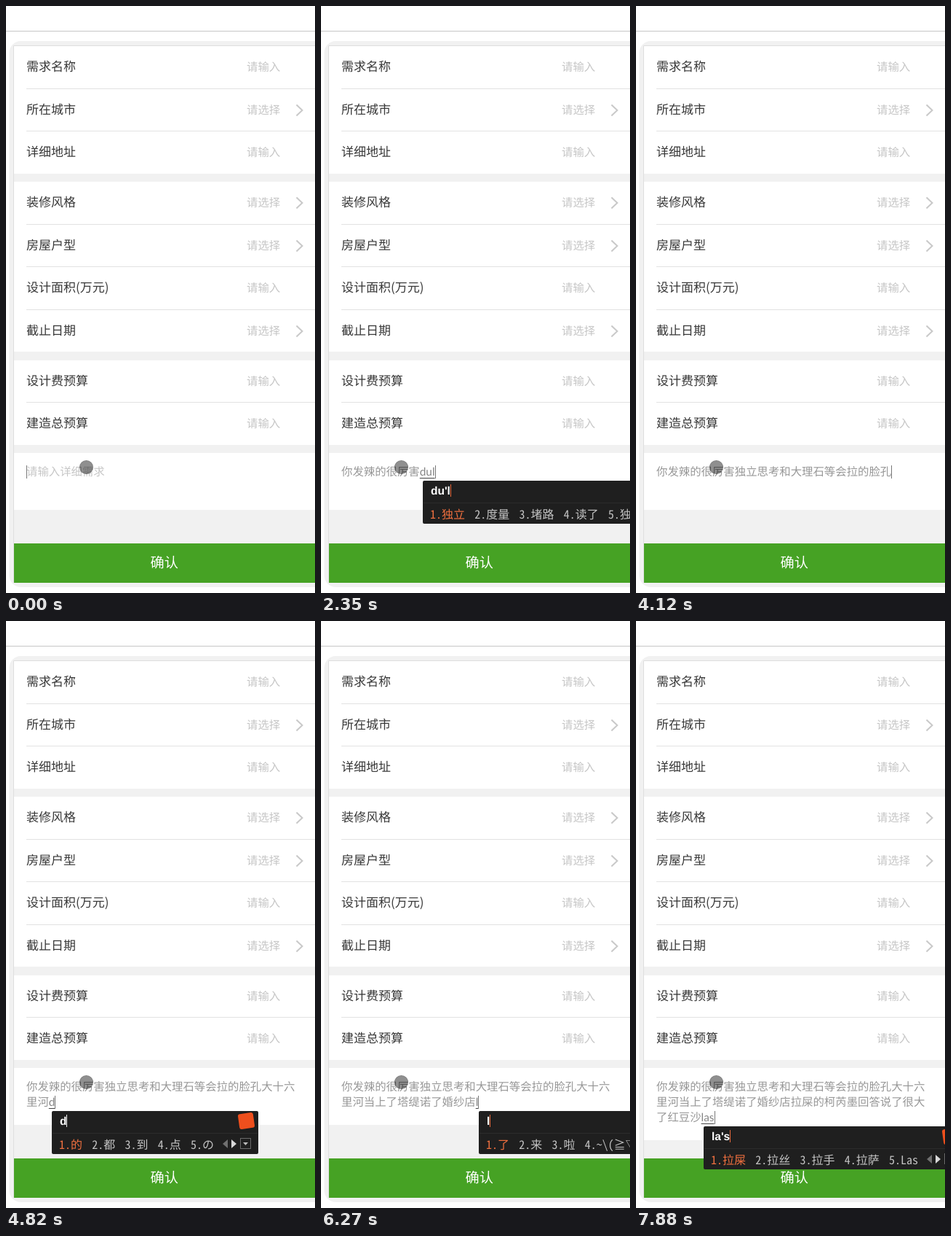
Animation, 425 px wide and 805 px high, one loop 8000 ms. Source, as an HTML page:

```html
<!DOCTYPE html>
<html lang="zh-CN">
<head>
<meta charset="utf-8">
<title>需求表单</title>
<style>
  html, body { margin: 0; width: 425px; height: 805px; overflow: hidden; background: #fff; }
  body {
    position: relative;
    font-family: "Noto Sans CJK SC", "Noto Sans CJK", "Noto Sans", sans-serif;
    text-rendering: geometricPrecision;
  }
  #form { position: absolute; left: 0; top: 0; }
  .label { font-size: 17px; fill: #383838; }
  .hint { font-size: 15.4px; fill: #c6c6c6; }
  .confirm { font-size: 19.2px; fill: #fff; text-anchor: middle; }

  #area { position: absolute; left: 11px; top: 613px; width: 414px; height: 78px; background: #fff; }
  #area.tall { height: 99px; }
  #text {
    position: absolute; left: 28px; top: 628px; width: 380px;
    font-size: 15.4px; line-height: 21px; color: #979797;
    white-space: pre-wrap; word-break: break-all;
  }
  #text.empty { color: #c6c6c6; }
  #text u {
    font-family: Lato, "Liberation Sans", sans-serif; line-height: 0; color: #858585;
    text-decoration: underline 1px #444; text-underline-offset: 3px;
  }
  .caret { position: absolute; width: 1px; height: 18px; margin-top: 2px; background: #777; }
  #touch {
    position: absolute; left: 101px; top: 623px; width: 19px; height: 19px; box-sizing: border-box;
    border-radius: 50%; background: rgba(0, 0, 0, .44); border: 1px solid rgba(0, 0, 0, .1);
  }

  #ime {
    position: absolute; height: 59px; background: #1f1f1f; border-radius: 2px;
    white-space: nowrap; color: #c4c4c4;
  }
  #ime::before {
    content: ""; position: absolute; left: 1px; right: 1px; top: 30px; height: 1px; background: #2c2c2c;
  }
  #pinyin {
    position: absolute; left: 11px; top: 5px; color: #fff;
    font: bold 15.5px/20px "Liberation Sans", Arial, sans-serif;
  }
  #pinyin::after {
    content: ""; display: inline-block; width: 1px; height: 17px;
    vertical-align: -3px; background: #e8693c;
  }
  .cold #pinyin::after { background: #eee; }
  #list {
    display: flex; gap: 13.2px; padding: 33px 10px 0 10px; line-height: 24px; height: 24px;
    font-family: "Noto Sans Mono CJK SC", "Noto Sans CJK SC", "Noto Sans CJK", monospace;
    font-size: 16px; font-weight: 300;
  }
  #list span:first-child { color: #f0703f; }
  #list.plain span:first-child { color: #c4c4c4; }
  #list.plain span:first-child i { color: #c9653c; }
  #list i { font-style: normal; }
  #list svg { flex: none; margin: 4px 0 0 -1px; }
  #badge {
    position: absolute; right: 6px; top: 3px; width: 21px; height: 21px;
    border-radius: 3px; background: #ee4f1d; transform: rotate(-8deg);
  }
</style>
</head>
<body>
<svg id="form" width="425" height="805">
  <path d="M0 34.5H425" stroke="#c6c6c6"/>
  <rect x="4.5" y="48" width="460" height="749" rx="16" fill="#f1f1f1"/>
  <path d="M10.5 791V54.5H425" fill="none" stroke="#dedede"/>
  <path d="M11 55H425V230H11zM11 241H425V474H11zM11 486H425V602H11z" fill="#fff"/>
  <rect x="11" y="737" width="414" height="54" fill="#46a224"/>
  <text class="confirm" x="217.7" y="770">确认</text>
  <g id="rows"></g>
</svg>
<div id="area"></div>
<div id="text"></div>
<div id="touch"></div>
<div id="ime"><div id="pinyin"></div><div id="badge"></div><div id="list"></div></div>

<script>
const $ = id => document.getElementById(id);

// Form rows: centre, label, opens a picker
const rows = [
  [83, '需求名称'], [142, '所在城市', 1], [200, '详细地址'],
  [269, '装修风格', 1], [328, '房屋户型', 1], [386, '设计面积(万元)'], [445, '截止日期', 1],
  [514, '设计费预算'], [572, '建造总预算']
];
const rules = [113, 171, 299, 357, 416, 543];
$('rows').innerHTML =
  rules.map(y => `<path d="M28 ${y + .5}H425" stroke="#e2e2e2"/>`).join('') +
  rows.map(([y, label, pick]) =>
    `<text class="label" x="28" y="${y + 6}">${label}</text>` +
    `<text class="hint" x="331" y="${y + 6}">${pick ? '请选择' : '请输入'}</text>` +
    (pick ? `<path d="M399.5 ${y - 6.5}l8 7.5l-8 7.5" fill="none" stroke="#c9c9c9" stroke-width="2"/>` : '')
  ).join('');

const story = '你发辣的很厉害独立思考和大理石等会拉的脸孔大十六' +
  '里河当上了塔缇诺了婚纱店拉屎的柯芮墨回答说了很大了红豆沙';
const D = '的 都 到 点 の';
const L = '了 来 啦 ~\\(≧▽≦)/~啦啦啦 咯';

// Start time, committed characters, pinyin being typed, candidates, popup style
const steps = [
  [0, 0],
  [280, 0, 'n', '你 那 能 呢 年'],
  [430, 0, 'ni', '你 尼 你们 你的 你好'],
  [740, 0, "ni'f", '你发 你放 你父亲 你分 Nif'],
  [1170, 2],
  [1320, 2, 'l', L, 'cold plain'],
  [1440, 2, 'la', '啦 拉 辣 ~\\(≧▽≦)/~啦啦啦 蜡'],
  [1570, 2, "la'de", '拉的 辣的 啦的 拉德 拉得'],
  [1700, 2, "la'de'hen", '辣的很 拉的很 拉得很 辣的 拉的'],
  [1830, 2, "la'de'hen'li'hai", '辣的很厉害 拉的很厉害 辣的很 拉的'],
  [1960, 7],
  [2100, 7, 'd', D],
  [2350, 7, "du'l", '独立 度量 堵路 读了 独立的'],
  [2490, 7, "du'li'si'k", '独立思考 独立 度 读 都'],
  [2630, 7, "du'li'si'kao'he", '独立思考和 独立思考 独立 度 读'],
  [2770, 7, "du'li'si'kao'he'da'li'shi", '独立思考和大理石 独立思考 独立'],
  [3050, 15],
  [3300, 15, 'd', D],
  [3450, 15, 'de', '的 得 德 地 嘚'],
  [3580, 15, "deng'h", '等会 等候 等号 等会儿 灯火'],
  [3710, 15, "deng'hui'la", '等会拉 等会啦 等会 等'],
  [3840, 15, "deng'hui'la'de'l", '等会拉的脸 等会拉的 等会'],
  [4120, 21],
  [4330, 21, "da's", '大声 打算 大赛 大师 大树'],
  [4500, 21, "da'shi'l", '大十六 大势 大事 大师'],
  [4680, 26],
  [4820, 26, 'd', D, 'cold'],
  [4950, 26, 'da', '大 打 达 答 搭'],
  [5100, 26, "dang's", '当上 当时 当是 党史 当事人'],
  [5220, 26, "dang'shang'l", '当上了 当上 挡上了 当 党'],
  [5330, 26, "dang'shang'le't", '当上了他 当上了 当上 当'],
  [5480, 26, "dang'shang'le'ta'ti'nuo", '当上了塔缇诺 当上了 当上'],
  [5620, 32],
  [5760, 32, 'l', L],
  [5880, 32, "le'h", '了会 乐呵 了很 了好 了还'],
  [6020, 32, "le'hun'sha'd", '了婚纱店 了婚纱 了婚'],
  [6150, 36],
  [6270, 36, 'l', L],
  [6400, 36, "la'shi", '拉屎 拉石 腊食 拉是 辣是'],
  [6550, 36, "la'shi'de'k", '拉屎的可 拉屎的 拉屎'],
  [6680, 36, "la'shi'de'ke'rui'mo", '拉屎的柯芮墨 拉屎的 拉屎'],
  [6820, 36, "la'shi'de'ke'rui'mo'hui'da'shuo", '拉屎的柯芮墨回答说 拉屎的'],
  [6970, 45],
  [7120, 45, 'l', L],
  [7270, 45, "le'hen", '了很 了恨 乐很 了狠 乐痕'],
  [7390, 52],
  [7550, 52, 'l', L],
  [7720, 52, 'la', '啦 拉 辣 ~\\(≧▽≦)/~啦啦啦 蜡'],
  [7880, 52, "la's", '拉屎 拉丝 拉手 拉萨 Las']
];

const pager = `<svg width="39" height="16">
  <path d="M7 2v12l-7-6z" fill="#707070"/><path d="M12 2v12l7-6z" fill="#d8d8d8"/>
  <rect x="24.5" y=".5" width="14" height="14" fill="none" stroke="#6a6a6a"/>
  <path d="M28 6h7l-3.5 4z" fill="#bbb"/></svg>`;

function show([, count, pinyin = '', words = '', style = '']) {
  const caret = '<span class="caret"></span>';
  const empty = !count && !pinyin;
  $('text').className = empty ? 'empty' : '';
  $('text').innerHTML = empty
    ? caret + '请输入详细需求'
    : story.slice(0, count) + (pinyin && `<u>${pinyin.replace(/'/g, '')}</u>`) + caret;
  $('area').className = count > 48 ? 'tall' : '';

  const ime = $('ime');
  ime.style.display = pinyin ? 'block' : 'none';
  if (!pinyin) return;
  const line = Math.floor(count / 24);
  ime.style.left = Math.round(31.8 + count % 24 * 15.4) + 'px';
  ime.style.top = 651 + line * 21 + 'px';
  ime.className = style;
  $('pinyin').textContent = pinyin;
  $('list').className = style;
  $('list').innerHTML = words.split(' ')
    .map((word, i) => `<span><i>${i + 1}.</i>${word}</span>`).join('') + pager;
}

let current;
function tick() {
  const time = performance.now() % 8000;
  const step = steps.findLast(s => s[0] <= time);
  if (step !== current) show(current = step);
  requestAnimationFrame(tick);
}
tick();
</script>
</body>
</html>
```
